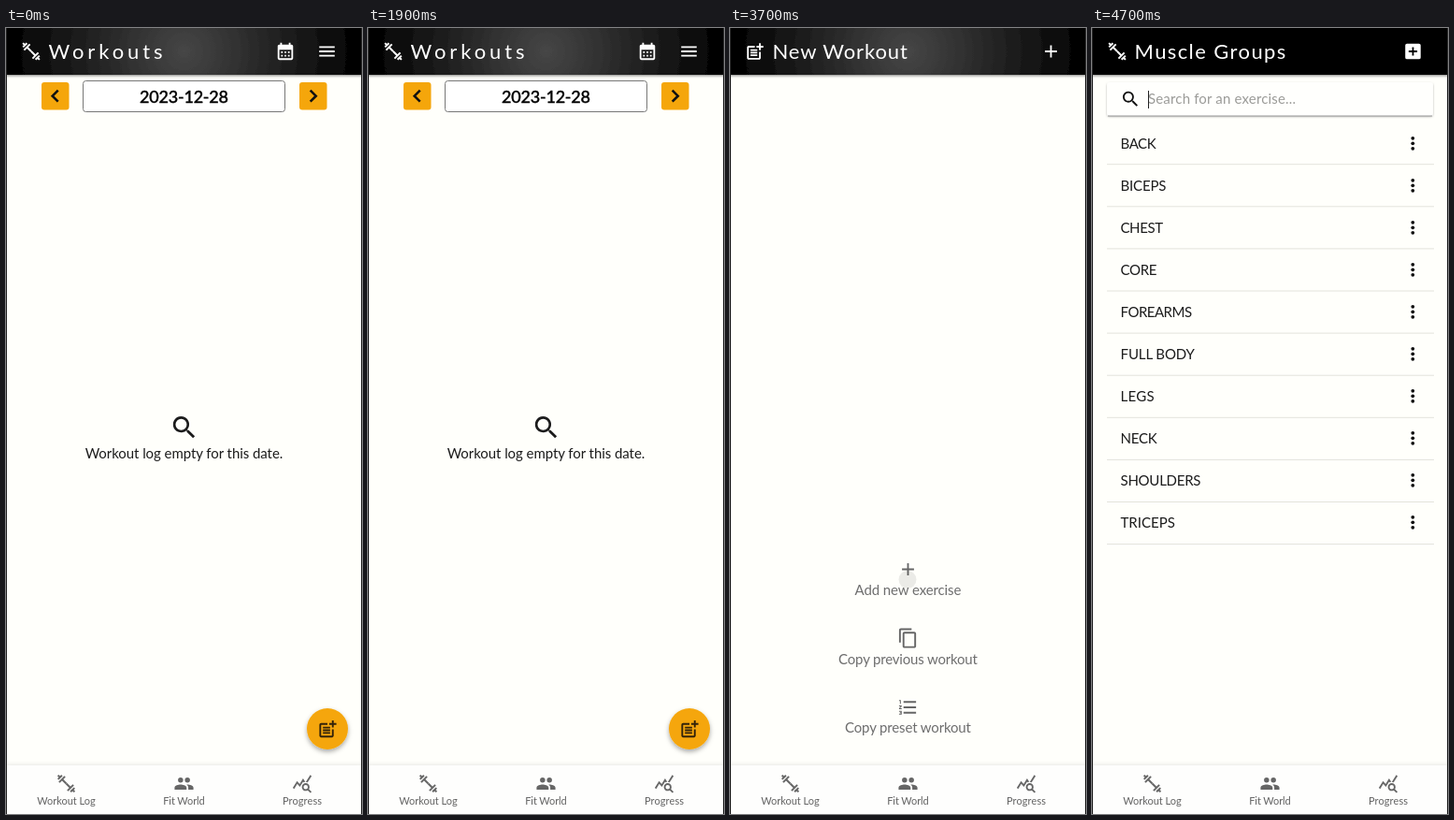
Recreate the animation shown at these times as an HTML page. Size 381 by 840 pixels, loop 5.2 s.

```html
<!DOCTYPE html>
<html lang="en">
<head>
<meta charset="utf-8">
<title>Workout log</title>
<style>
  html, body { margin: 0; width: 100%; height: 100%; overflow: hidden; background: #fffffb; }
  svg { display: block; position: absolute; left: 0; top: 0; }
  text { font-family: Outfit, Lato, "Open Sans", sans-serif; font-size: 15px; white-space: pre; }
  .title { font-size: 22px; fill: #fff; }
  .tab { font-size: 11px; fill: #626262; }
  .date { font-size: 18px; font-weight: 500; stroke: #000; stroke-width: .35px; }
</style>
</head>
<body>
<svg id="stage" width="381" height="840" viewBox="0 0 381 840">
  <defs>
    <radialGradient id="sheen" gradientUnits="userSpaceOnUse" cx="190.5" cy="25" r="191">
      <stop offset="0" stop-color="#464646"/>
      <stop offset="1" stop-color="#000"/>
    </radialGradient>
    <filter id="soft" x="-30%" y="-30%" width="160%" height="170%">
      <feDropShadow dx="0" dy="2.5" stdDeviation="2.5" flood-opacity=".34"/>
    </filter>
    <filter id="drop" x="-5%" y="-20%" width="110%" height="150%">
      <feDropShadow dx="0" dy="1" stdDeviation="1.5" flood-opacity=".5"/>
    </filter>
    <filter id="lift" x="-5%" y="-30%" width="110%" height="160%">
      <feDropShadow dx="0" dy="-1" stdDeviation="2" flood-opacity=".09"/>
    </filter>
    <filter id="field" x="-5%" y="-20%" width="110%" height="150%">
      <feDropShadow dx="0" dy="1" stdDeviation="1" flood-opacity=".28"/>
    </filter>
  </defs>
</svg>
<script>
const LOOP = 5200;
const AMBER = '#f5a60b', GREY = '#666', INK = '#1c1c1c';

// Icon outlines on a 24 unit grid
const ICONS = {
  menu: 'M3 18h18v-2H3v2zm0-5h18v-2H3v2zm0-7v2h18V6H3z',
  plus: 'M19 13h-6v6h-2v-6H5v-2h6V5h2v6h6v2z',
  addBox: 'M19 3H5a2 2 0 0 0-2 2v14a2 2 0 0 0 2 2h14a2 2 0 0 0 2-2V5a2 2 0 0 0-2-2zm-2 10h-4v4h-2v-4H7v-2h4V7h2v4h4v2z',
  calendar: 'M19 4h-1V2h-2v2H8V2H6v2H5c-1.1 0-2 .9-2 2v14a2 2 0 0 0 2 2h14c1.1 0 2-.9 2-2V6c0-1.1-.9-2-2-2zm0 16H5V10h14v10zM9 14H7v-2h2v2zm4 0h-2v-2h2v2zm4 0h-2v-2h2v2zm-8 4H7v-2h2v2zm4 0h-2v-2h2v2zm4 0h-2v-2h2v2z',
  note: 'M17 19H5V7h7V5H5c-1.1 0-2 .9-2 2v12c0 1.1.9 2 2 2h12c1.1 0 2-.9 2-2v-7h-2v7zM19 2h-2v3h-3v2h3v3h2V7h3V5h-3V2zM7 9h8v2H7zM7 12h8v2H7zM7 15h8v2H7z',
  search: 'M15.5 14h-.8l-.3-.3A6.5 6.5 0 1 0 13.7 14.4l.3.3v.8l5 5L20.5 19l-5-5zm-6 0a4.5 4.5 0 1 1 0-9 4.5 4.5 0 0 1 0 9z',
  people: 'M16 11a3 3 0 1 0 0-6 3 3 0 0 0 0 6zm-8 0a3 3 0 1 0 0-6 3 3 0 0 0 0 6zm0 2c-2.33 0-7 1.17-7 3.5V19h14v-2.5c0-2.33-4.67-3.5-7-3.5zm8 0c-.29 0-.62.02-.97.05 1.16.84 1.97 1.97 1.97 3.45V19h6v-2.5c0-2.33-4.67-3.5-7-3.5z',
  stats: 'M19.88 18.47c.44-.7.7-1.51.7-2.39a4.5 4.5 0 1 0-4.5 4.5c.87 0 1.69-.26 2.38-.7L21.58 23 23 21.58l-3.12-3.11zm-3.8.11a2.5 2.5 0 1 1 0-5 2.5 2.5 0 0 1 0 5zm-.36-8.5c-.74.02-1.45.18-2.1.45l-.55-.83-3.8 6.18-3.01-3.52-3.63 5.81L1 17l5-8 3 3.5L13 6l2.72 4.08zm2.59.5c-.64-.28-1.33-.45-2.05-.49L21.38 2 23 3.18l-4.69 7.4z',
  copy: 'M16 1H4c-1.1 0-2 .9-2 2v14h2V3h12V1zm3 4H8c-1.1 0-2 .9-2 2v14c0 1.1.9 2 2 2h11c1.1 0 2-.9 2-2V7c0-1.1-.9-2-2-2zm0 16H8V7h11v14z',
  list: 'M2 17h2v.5H3v1h1v.5H2v1h3v-4H2v1zm1-9h1V4H2v1h1v3zm-1 3h1.8L2 13.1v.9h3v-1H3.2L5 10.9V10H2v1zm5-6v2h14V5H7zm0 14h14v-2H7v2zm0-6h14v-2H7v2z'
};

const stage = document.getElementById('stage');

function add(parent, tag, attrs = {}, content) {
  const node = document.createElementNS('http://www.w3.org/2000/svg', tag);
  for (const key in attrs) node.setAttribute(key, attrs[key]);
  if (content) node.textContent = content;
  return parent.appendChild(node);
}

const group = parent => add(parent, 'g');

function rect(parent, x, y, width, height, fill, more = {}) {
  return add(parent, 'rect', { x, y, width, height, fill, ...more });
}

function label(parent, x, y, content, spacing = 0, more = {}) {
  return add(parent, 'text', { x, y, fill: INK, 'letter-spacing': spacing, ...more }, content);
}

function centred(parent, x, y, content, spacing = 0, more = {}) {
  return label(parent, x + spacing / 2, y, content, spacing, { 'text-anchor': 'middle', ...more });
}

function icon(parent, name, cx, cy, size, fill) {
  const k = size / 24;
  add(parent, 'path', {
    d: ICONS[name], fill,
    transform: `translate(${cx - size / 2} ${cy - size / 2}) scale(${k})`
  });
}

function dumbbell(parent, cx, cy, color) {
  const half = 'M0 0L-4.5 -4.5M-7.6 -1.4L-1.4 -7.6M-8.8 -4.6L-4.6 -8.8M-8.9 -8.9L-7 -7';
  for (const turn of [0, 180]) {
    add(parent, 'path', {
      d: half, fill: 'none', stroke: color, 'stroke-width': 2,
      transform: `translate(${cx} ${cy}) rotate(${turn})`
    });
  }
}

function header(parent, title, spacing, fill) {
  rect(parent, 0, 0, 381, 50, fill, { filter: 'url(#drop)' });
  label(parent, 45.5, 33, title, spacing, { class: 'title' });
}

function arrowButton(parent, x, dir) {
  rect(parent, x, 58, 29.5, 29.5, AMBER, { rx: 3 });
  add(parent, 'path', {
    d: 'M-3 -6L3 0L-3 6', fill: 'none', stroke: '#111', 'stroke-width': 2.6,
    transform: `translate(${x + 14.7} 72.7) scale(${dir} 1)`
  });
}

function buildLog(g) {
  header(g, 'Workouts', 3.9, 'url(#sheen)');
  dumbbell(g, 27, 25, '#fff');
  icon(g, 'calendar', 299, 25, 22, '#fff');
  icon(g, 'menu', 343.5, 25, 22, '#fff');
  arrowButton(g, 38, -1);
  arrowButton(g, 314, 1);
  rect(g, 82.5, 56.5, 216, 33, '#fff', { rx: 3, stroke: '#777' });
  centred(g, 190.5, 80, '2023-12-28', -.2, { class: 'date', fill: '#000' });
  icon(g, 'search', 190.8, 427, 32, INK);
  centred(g, 190.5, 460, 'Workout log empty for this date.', -.06);
  add(g, 'circle', { cx: 344, cy: 749, r: 22, fill: AMBER, filter: 'url(#soft)' });
  icon(g, 'note', 344, 749.5, 23, '#33230a');
}

function buildNew(g) {
  header(g, 'New Workout', .9, 'url(#sheen)');
  icon(g, 'note', 26.5, 25.5, 22, '#fff');
  icon(g, 'plus', 343.5, 25, 22, '#fff');
  const choices = [
    ['plus', 578.5, 22, 'Add new exercise', 606, -.1],
    ['copy', 652, 23, 'Copy previous workout', 680, -.18],
    ['list', 726, 23, 'Copy preset workout', 753, -.15]
  ];
  for (const [name, cy, size, content, y, spacing] of choices) {
    icon(g, name, 190.5, cy, size, GREY);
    centred(g, 190.5, y, content, spacing, { fill: '#6e6e6e' });
  }
}

function buildGroups(g) {
  header(g, 'Muscle Groups', 1.4, '#000');
  dumbbell(g, 27, 25, '#fff');
  icon(g, 'addBox', 343.5, 25, 22, '#fff');
  rect(g, 16, 58, 349, 36, '#fffffd', { rx: 3, filter: 'url(#field)' });
  rect(g, 17, 93.5, 347, 1, '#999');
  icon(g, 'search', 41.2, 76, 22, '#111');
  label(g, 60, 81, 'Search for an exercise...', .17, { fill: '#9b9b98' });
  const rows = [
    ['BACK', -.4], ['BICEPS', -.15], ['CHEST', -.4], ['CORE', -.3], ['FOREARMS', -.5],
    ['FULL BODY', -.1], ['LEGS', .3], ['NECK', -.2], ['SHOULDERS', -.25], ['TRICEPS', 0]
  ];
  rows.forEach(([name, spacing], i) => {
    const y = 124 + 45 * i;
    label(g, 30.5, y + 5.3, name, spacing);
    for (const dy of [-5.5, 0, 5.5]) {
      add(g, 'circle', { cx: 343.3, cy: y - .7 + dy, r: 1.9, fill: '#111' });
    }
    rect(g, 16, 145.2 + 45.1 * i, 350, 1, '#e3e3dc');
  });
}

function buildTabs(g) {
  rect(g, 0, 788, 381, 52, '#fefefd', { filter: 'url(#lift)' });
  dumbbell(g, 64.5, 807.5, GREY);
  icon(g, 'people', 190.5, 807.5, 22, GREY);
  icon(g, 'stats', 317, 807.5, 22, GREY);
  centred(g, 64.5, 830, 'Workout Log', 0, { class: 'tab' });
  centred(g, 190.5, 830, 'Fit World', -.08, { class: 'tab' });
  centred(g, 317, 830, 'Progress', .1, { class: 'tab' });
}

rect(stage, 0, 0, 381, 840, '#fffffb');
const log = group(stage), fresh = group(stage), groups = group(stage);
buildLog(log);
buildNew(fresh);
buildGroups(groups);
const touch = add(stage, 'circle', { cx: 190, cy: 589.5, r: 9.5, fill: '#000', 'fill-opacity': .08 });
const caret = rect(stage, 60, 67, 1, 19, '#222');
buildTabs(group(stage));
rect(stage, 0, 0, 1, 840, '#222');
rect(stage, 380, 0, 1, 840, '#222');

// Each part with the time span in which it is on screen
const spans = [
  [log, 0, 2000],
  [fresh, 2000, 3800],
  [touch, 3700, 3800],
  [groups, 3800, LOOP],
  [caret, 4700, LOOP]
];

function draw() {
  const t = performance.now() % LOOP;
  for (const [node, from, to] of spans) {
    node.style.display = t >= from && t < to ? '' : 'none';
  }
  requestAnimationFrame(draw);
}
draw();
</script>
</body>
</html>
```
